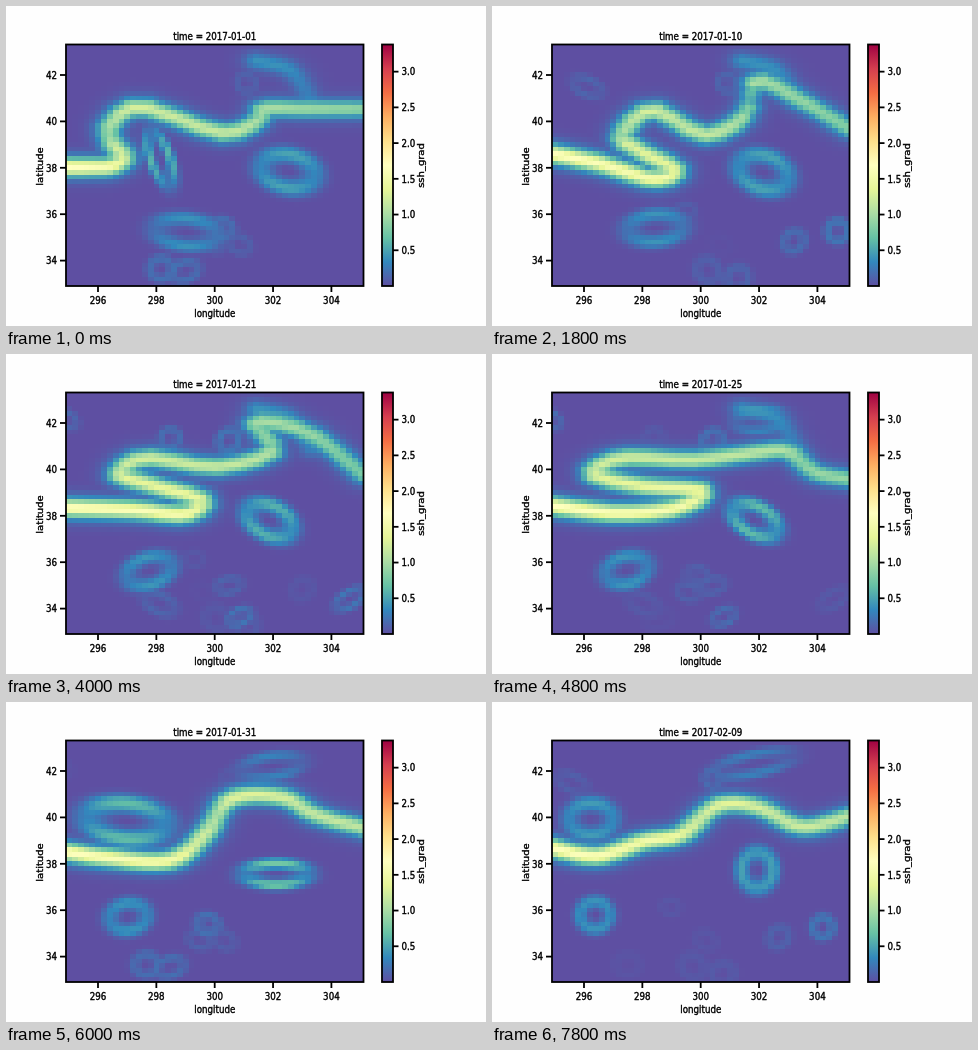
Recreate the animation shown at these times as an HTML page with a canvas. Size 480x320 px, loop 8 s.

```html
<!DOCTYPE html>
<html lang="en">
<head>
<meta charset="utf-8">
<title>Sea surface height gradient</title>
<style>
html, body { margin: 0; width: 100%; height: 100%; overflow: hidden; background: #fefefe; }
canvas { display: block; width: 100vw; height: 100vh; }
</style>
</head>
<body>
<canvas id="stage" width="480" height="320"></canvas>
<script>
const ctx = document.getElementById('stage').getContext('2d');
const STEP = 200, DAYS = 40, COLS = 51, ROWS = 52, MAX = 3.38;
const MAP = { x: 60, y: 38.5, w: 297.5, h: 241.5 };
const BAR = { x: 376, y: 38.5, w: 11, h: 241.5 };
const RAMP = ['5e4fa2', '3288bd', '66c2a5', 'abdda4', 'e6f598', 'ffffbf',
  'fee08b', 'fdae61', 'f46d43', 'd53e4f', '9e0142']
  .map(hex => [0, 2, 4].map(i => parseInt(hex.slice(i, i + 2), 16)));

// The meander's neck closes on this day and its loop drifts off as an eddy.
const PINCH = 27;

// Key points by day: inlet, loop tip, western turn, crest, trough, rise, outlet.
const MEANDER = {
  0: [60,161, 85,161, 105,160, 118,151, 107,138, 104,120, 135,101, 215,127, 252,114, 258,103, 300,103, 357,103],
  9: [60,148, 110,158, 160,173, 183,164, 150,146, 130,130, 160,104, 212,129, 252,110, 265,75, 310,95, 357,123],
  15: [60,150, 120,152, 165,165, 192,152, 155,138, 130,124, 155,106, 220,126, 262,108, 266,80, 315,98, 357,128],
  20: [60,154, 130,156, 178,160, 195,146, 145,131, 113,120, 140,104, 210,113, 266,97, 250,68, 305,80, 357,121],
  24: [60,152, 125,159, 185,154, 209,137, 150,132, 101,120, 130,104, 200,106, 260,99, 295,97, 322,118, 357,125],
};
const STRAIGHT = {
  30: [60,150, 105,156, 165,158, 200,131, 225,97, 275,95, 310,113, 357,126],
  39: [60,146, 105,154, 150,140, 190,132, 225,104, 265,105, 310,125, 357,114],
};
const BRANCH = [250,55, 285,65, 305,95];

// Eddies by day: centre x, y, radius x, y, tilt, strength.
const EDDIES = [
  { 0: [282,165,27,17,.2,.5], 15: [264,167,24,17,.4,.5], 24: [263,166,24,14,.5,.65], 30: [270,172,30,11,0,.75], 39: [265,168,16,18,0,.48] },
  { 0: [180,226,30,14,.1,.4], 20: [143,217,23,14,-.3,.42], 39: [103,213,15,14,0,.4] },
  { 0: [154,152,10,26,-.35,.6], 8: [154,150,10,26,-.35,0] },
  { 20: [268,66,24,11,-.1,0], 24: [268,66,24,11,-.1,.32], 39: [262,62,36,10,-.2,.3] },
  { 26: [125,120,40,18,.1,0], 30: [120,119,38,18,.1,.65], 39: [99,117,22,16,0,.45] },
];

const mix = (a, b, f) => a.map((v, i) => v + (b[i] - v) * f);
const clamp = (v, lo, hi) => Math.max(lo, Math.min(hi, v));

let seed = 11;
const random = (lo, hi) => {
  seed = seed * 16807 % 2147483647;
  return lo + (hi - lo) * seed / 2147483647;
};

// Short-lived weak swirls, mostly in the south.
const swirls = Array.from({ length: 20 }, (_, i) => ({
  x: random(70, 365), y: i % 4 ? random(205, 275) : random(45, 90),
  rx: random(9, 16), ry: random(7, 11), tilt: random(-.8, .8),
  strength: random(.12, .28), phase: random(0, 2 * Math.PI),
}));

function pose(keys, day) {
  const days = Object.keys(keys).map(Number);
  const i = clamp(days.findLastIndex(d => d <= day), 0, days.length - 2);
  const [from, to] = [days[i], days[i + 1]];
  return mix(keys[from], keys[to], clamp((day - from) / (to - from), 0, 1));
}

// Smooth curve through flat x, y pairs.
function curve(flat, samples = 36) {
  const last = flat.length / 2 - 1;
  const point = k => { const i = 2 * clamp(k, 0, last); return [flat[i], flat[i + 1]]; };
  return Array.from({ length: samples + 1 }, (_, s) => {
    const u = s / samples * last, k = Math.min(Math.floor(u), last - 1), f = u - k;
    const [a, b, c, d] = [-1, 0, 1, 2].map(o => point(k + o));
    return b.map((v, i) => v + f / 2 * (c[i] - a[i] +
      f * (2 * a[i] - 5 * v + 4 * c[i] - d[i] + f * (3 * (v - c[i]) + d[i] - a[i]))));
  });
}

// A current weakens downstream and where it runs north or south.
function current(flat, inflow, outflow) {
  const pts = curve(flat);
  return pts.slice(1).map(([x2, y2], i) => {
    const [x, y] = pts[i], dx = x2 - x, dy = y2 - y;
    const zonal = Math.abs(dx) / Math.hypot(dx, dy);
    const strength = inflow + (outflow - inflow) * i / pts.length;
    return { x, y, dx: dx * .72, dy, strength: strength * (.45 + .55 * zonal) };
  });
}

// Bright core with a soft fringe.
function currentAt(segments, px, py) {
  let best = 0;
  for (const { x, y, dx, dy, strength } of segments) {
    const ox = (px - x) * .72, oy = py - y;
    const f = clamp((ox * dx + oy * dy) / (dx * dx + dy * dy), 0, 1);
    const d2 = (ox - f * dx) ** 2 + (oy - f * dy) ** 2;
    if (d2 < 900) best = Math.max(best, strength * (.7 * Math.exp(-d2 / 56) + .3 * Math.exp(-d2 / 169)));
  }
  return best;
}

// Slope of a rounded bump: a ring, strongest across its short axis.
function eddyAt([cx, cy, rx, ry, tilt, strength], px, py) {
  const dx = px - cx, dy = py - cy, c = Math.cos(tilt), s = Math.sin(tilt);
  const u = (dx * c + dy * s) / rx, v = (dy * c - dx * s) / ry;
  const rho2 = u * u + v * v + 1e-6;
  if (rho2 > 5) return 0;
  const slope = Math.hypot(u / rx, v / ry) * Math.min(rx, ry) / Math.sqrt(rho2);
  return strength * slope * rho2 * Math.exp((1 - rho2 * rho2) / 2);
}

function seaAt(day) {
  const currents = day < PINCH
    ? [current(pose(MEANDER, day), 1.7, .85), current(BRANCH, .4, .4)]
    : [current(pose(STRAIGHT, day), 1.7, 1.1)];
  const eddies = EDDIES.map(keys => pose(keys, day));
  for (const w of swirls) {
    const life = Math.max(0, Math.sin(day / 5 + w.phase));
    eddies.push([w.x - day * .5, w.y, w.rx, w.ry, w.tilt, w.strength * life]);
  }
  return (x, y) => {
    let sum = 0;
    for (const c of currents) sum += currentAt(c, x, y) ** 3;
    for (const e of eddies) sum += eddyAt(e, x, y) ** 3;
    return Math.cbrt(sum);
  };
}

function colour(value) {
  const u = Math.min(.9999, value / MAX) * 10, k = Math.floor(u);
  return mix(RAMP[k], RAMP[k + 1], u - k);
}

const grid = document.createElement('canvas');
grid.width = COLS;
grid.height = ROWS;
const gridCtx = grid.getContext('2d');
const pixels = gridCtx.createImageData(COLS, ROWS);

function drawField(day) {
  const slope = seaAt(day);
  for (let r = 0; r < ROWS; r++) for (let c = 0; c < COLS; c++) {
    const x = MAP.x + (c + .5) * MAP.w / COLS, y = MAP.y + (r + .5) * MAP.h / ROWS;
    pixels.data.set([...colour(slope(x, y)), 255], 4 * (r * COLS + c));
  }
  gridCtx.putImageData(pixels, 0, 0);
  ctx.imageSmoothingEnabled = false;
  ctx.drawImage(grid, MAP.x, MAP.y, MAP.w, MAP.h);
}

// The whole figure is narrower than it is tall, lettering included.
function label(text, x, y, align = 'center', turn = 0) {
  ctx.save();
  ctx.translate(x, y);
  ctx.scale(.87, 1);
  ctx.rotate(turn);
  ctx.textAlign = align;
  ctx.lineWidth = .4;
  ctx.fillText(text, 0, 0);
  ctx.strokeText(text, 0, 0);
  ctx.restore();
}

function line(x1, y1, x2, y2) {
  ctx.beginPath();
  ctx.moveTo(x1, y1);
  ctx.lineTo(x2, y2);
  ctx.stroke();
}

const barFill = ctx.createLinearGradient(0, BAR.y + BAR.h, 0, BAR.y);
RAMP.forEach((c, i) => barFill.addColorStop(i / 10, `rgb(${c})`));

function draw(day) {
  ctx.fillStyle = '#fefefe';
  ctx.fillRect(0, 0, 480, 320);
  drawField(day);
  ctx.fillStyle = barFill;
  ctx.fillRect(BAR.x, BAR.y, BAR.w, BAR.h);

  ctx.fillStyle = ctx.strokeStyle = '#000';
  ctx.lineWidth = 1.8;
  ctx.font = '10px "DejaVu Sans", sans-serif';
  for (const b of [MAP, BAR]) ctx.strokeRect(b.x, b.y, b.w, b.h);
  for (let i = 0; i < 5; i++) {
    const x = 92 + i * 58.35, y = 69 + i * 46.4;
    line(x, 280, x, 286);
    label(296 + 2 * i, x, 298);
    line(54, y, 60, y);
    label(42 - 2 * i, 51, y + 3.7, 'right');
  }
  for (let v = .5; v <= 3; v += .5) {
    const y = 280 - v * BAR.h / MAX;
    line(387, y, 392.5, y);
    label(v.toFixed(1), 395.5, y + 3.7, 'left');
  }
  const date = new Date(Date.UTC(2017, 0, 1 + day)).toISOString().slice(0, 10);
  label('time = ' + date, 208.8, 33.5);
  label('longitude', 208.8, 310.5);
  label('latitude', 37, 160.5, 'center', -Math.PI / 2);
  label('ssh_grad', 418, 159.5, 'center', -Math.PI / 2);
}

const start = performance.now();
let shown = -1;
function tick() {
  const day = Math.floor((performance.now() - start) / STEP) % DAYS;
  if (day !== shown) draw(shown = day);
  requestAnimationFrame(tick);
}
tick();
</script>
</body>
</html>
```
